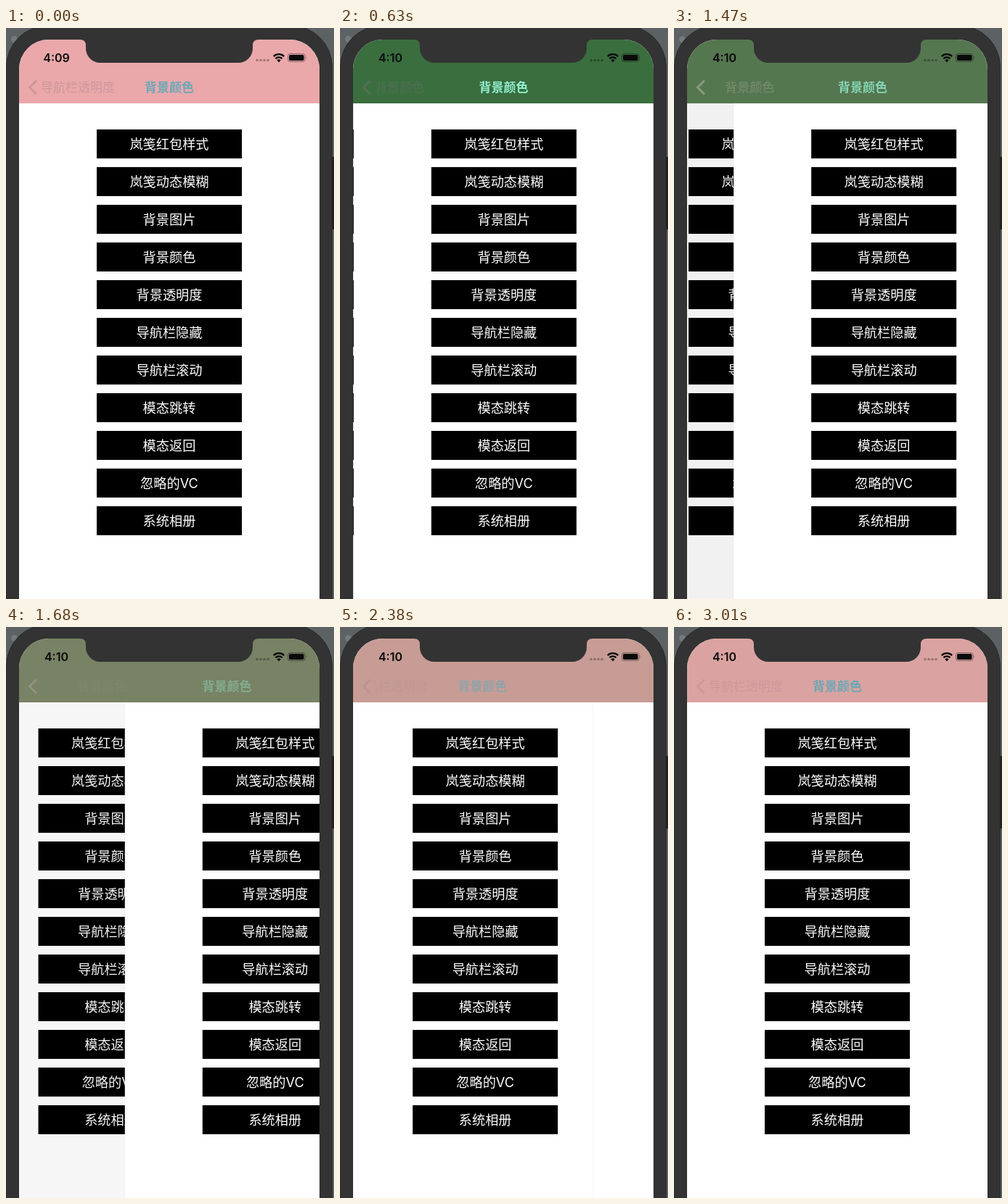
Recreate the animation shown at these times as an HTML page. Size 452 by 788 pixels, loop 3080 ms.

```html
<!DOCTYPE html>
<html lang="zh-CN">
<head>
<meta charset="utf-8">
<title>导航栏转场</title>
<style>
  html, body { margin: 0; width: 100%; height: 100%; overflow: hidden; }
  body {
    position: relative;
    background: #5c6264;
    font-family: Inter, "Noto Sans CJK SC", "Noto Sans CJK", sans-serif;
  }
  div, span, svg { position: absolute; }
  .phone {
    left: 0; top: -4px; width: 450px; height: 900px;
    box-sizing: border-box;
    border: 1px solid #292929;
    border-radius: 58px;
    background: #333;
  }
  .knob { left: 7px; top: 11px; width: 9px; height: 9px; border-radius: 50%; background: #74797b; }
  .side { left: 449px; top: 178px; width: 3px; height: 100px; background: #222; }
  .screen {
    left: 18px; top: 16px; width: 414px; height: 772px;
    border-radius: 41px 41px 0 0;
    overflow: hidden;
    background: #fff;
  }
  .page { left: 0; top: 88px; width: 414px; height: 684px; background: #fff; }
  #front { box-shadow: -1px 0 1px rgba(0, 0, 0, .06); }
  .page .item {
    left: 107px; width: 200px; height: 40px;
    background: #000; color: #fff;
    font-size: 18.2px; line-height: 40px; text-align: center;
  }
  #dim { inset: 0; background: #000; }
  .bar { left: 0; top: 0; width: 414px; height: 88px; overflow: hidden; }
  .bar span { left: 0; top: 0; font-size: 17px; line-height: 20px; white-space: nowrap; }
  .bar .title { top: 56px; font-weight: 600; }
  .labels { left: 28px; top: 56px; width: 386px; height: 24px; overflow: hidden; }
  #clock {
    left: 21px; top: 15px; width: 61px;
    font-size: 16px; font-weight: 600; line-height: 20px; text-align: center; color: #0a0a0a;
  }
  .overlay { left: 0; top: 0; }
</style>
</head>
<body>
<div class="knob"></div>
<div class="phone"></div>
<div class="side"></div>
<div class="screen">
  <div class="page" id="back"></div>
  <div class="page" id="front"></div>
  <div class="bar" id="bar">
    <div class="labels">
      <span id="backLabel">导航栏透明度</span>
      <span id="frontLabel">背景颜色</span>
    </div>
    <span class="title" id="backTitle" style="color:#68a8b8">背景颜色</span>
    <span class="title" id="frontTitle" style="color:#93f0d0">背景颜色</span>
  </div>
  <div id="clock">4:09</div>
</div>
<svg class="overlay" width="452" height="110" fill="none">
  <path fill="#333" d="M102 14V16Q110 16 110 24V28A20 20 0 0 0 130 48H320A20 20 0 0 0 340 28V24Q340 16 348 16V14Z"/>
  <path id="chevron" d="M42 72.5L32.5 82L42 91.5" stroke-width="3"/>
  <g fill="#000" fill-opacity=".3">
    <circle cx="346" cy="44.5" r="1.8"/><circle cx="351" cy="44.5" r="1.8"/>
    <circle cx="356" cy="44.5" r="1.8"/><circle cx="361" cy="44.5" r="1.8"/>
  </g>
  <g stroke="#0a0a0a" stroke-width="2.3">
    <path d="M368.8 39.2A10.2 10.2 0 0 1 383.2 39.2"/>
    <path d="M371.4 42.2A6.5 6.5 0 0 1 380.6 42.2"/>
  </g>
  <path fill="#0a0a0a" d="M376 47.2L373.3 44.4A4 4 0 0 1 378.7 44.4Z"/>
  <rect x="388.5" y="35.5" width="23.5" height="11" rx="3" stroke="#000" stroke-opacity=".4"/>
  <rect x="390" y="37" width="20.5" height="8" rx="1.7" fill="#0a0a0a"/>
  <path d="M413.2 39.3q1.5 1.7 0 3.4z" fill="#000" fill-opacity=".4"/>
</svg>
<script>
const LOOP = 3080, STEP = 70, WIDTH = 414;
const PUSH = 56, SWIPE = 1190;
const GREEN = [58, 110, 63], PINK = [234, 168, 171];
const ITEMS = ['岚笺红包样式', '岚笺动态模糊', '背景图片', '背景颜色', '背景透明度',
  '导航栏隐藏', '导航栏滚动', '模态跳转', '模态返回', '忽略的VC', '系统相册'];

// Swipe progress over time, then chevron and label tint over progress
const DRAG = [[1190, 0], [1260, .02], [1365, .075], [1470, .155], [1715, .385], [1960, .587],
  [2170, .715], [2380, .8], [2625, .87], [2870, .91], [2940, .975], [3010, 1]];
const TINT = [[0, [82, 112, 84]], [.07, [92, 122, 92]], [.155, [138, 153, 128]],
  [.587, [155, 139, 124]], [.8, [186, 147, 145]], [1, [206, 151, 155]]];

const el = id => document.getElementById(id);
const clamp = v => Math.max(0, Math.min(1, v));
const mix = (a, b, k) => Array.isArray(a) ? a.map((v, i) => mix(v, b[i], k)) : a + (b - a) * k;
const rgb = c => `rgb(${c.map(Math.round)})`;

function sample(stops, x) {
  const i = stops.findIndex(s => s[0] >= x);
  if (i < 0) return stops[stops.length - 1][1];
  if (i === 0) return stops[0][1];
  const [x0, a] = stops[i - 1], [x1, b] = stops[i];
  return mix(a, b, (x - x0) / (x1 - x0));
}

function place(id, x, alpha = 1) {
  el(id).style.transform = `translateX(${x}px)`;
  el(id).style.opacity = clamp(alpha);
}

// 1: back page fully shown, 0: front page fully shown
function reveal(t) {
  if (t < STEP) return 1;
  if (t >= SWIPE) return sample(DRAG, t);
  if (t >= 700) return 0;
  const s = 14.7 * (t - PUSH) / 1000;
  return (1 + s) * Math.exp(-s);
}

function render(t) {
  const q = reveal(t);
  const shade = t < SWIPE ? q * q : Math.min(q, .91);
  const tint = rgb(sample(TINT, q));

  place('back', -.3 * WIDTH * (1 - q));
  place('front', WIDTH * q + (q === 1 ? 4 : 0));
  el('dim').style.opacity = Math.max(0, .073 - .105 * q);

  el('bar').style.background = rgb(mix(GREEN, PINK, shade));
  place('backTitle', 30 + 143 * q, 2 * q - 1);
  place('frontTitle', 173 + 226 * q, 1.1 - 2 * q);
  place('backLabel', 2 - 145 * (1 - q), 2 * q - 1);
  place('frontLabel', 2 + 143 * q, 1 - 2 * q);
  el('backLabel').style.color = el('frontLabel').style.color = tint;
  el('chevron').style.stroke = tint;
  el('clock').textContent = t < STEP ? '4:09' : '4:10';
}

for (const id of ['back', 'front']) {
  el(id).innerHTML = ITEMS.map((name, i) =>
    `<div class="item" style="top:${36 + 52 * i}px">${name}</div>`).join('');
}
el('back').insertAdjacentHTML('beforeend', '<div id="dim"></div>');

const start = performance.now();
function tick() {
  const t = (performance.now() - start) % LOOP;
  render(Math.floor(t / STEP) * STEP);
  requestAnimationFrame(tick);
}
tick();
</script>
</body>
</html>
```
